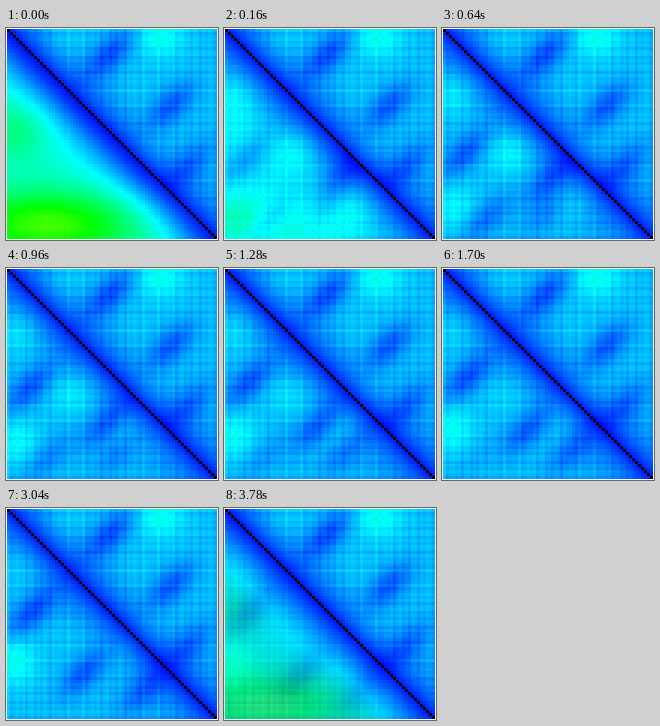
These frames come from a looping animation (212x212 px, 3840 ms). A matplotlib script:

```python
import numpy as np
import matplotlib.pyplot as plt
from matplotlib.animation import FuncAnimation

SIZE, CELLS, CELL = 212, 70, 3
LOOP, TICK = 3840, 20
COLLAPSE, FOLDED, FADE = 320, 2720, 3780

idx = np.arange(CELLS)
pos = 1 + CELL * (idx + 0.5)
X, Y = np.meshgrid(pos, pos)
gap = np.abs(X - Y)

# Side chains alternate along the backbone and weave faint stripes
wave = np.cos(2 * np.pi * idx / 2.5) + 0.6 * np.cos(2 * np.pi * idx / 4.2 + 1)
weave = 0.05 * np.add.outer(wave, wave) * np.minimum(1, gap / 35)

# Contacts travel from a misfolded pose to the native one: (x, y, depth)
FOLDS = [((22, 131, 0.38), (26, 104, 0.42)),
         ((114, 151, 0.34), (78, 165, 0.38)),
         ((100, 182, 0.22), (136, 184, 0.28)),
         ((46, 192, 0.40), (34, 186, 0.00))]
GLOWS = [((70, 124, 0.36), (64, 128, 0.08)),
         ((12, 186, 0.20), (7, 154, 0.34)),
         ((130, 178, 0.24), (112, 146, 0.10)),
         ((12, 68, 0.28), (12, 60, 0.14))]


def spot(x, y, a, b):
    return np.exp(-((X - x) / a) ** 2 / 2 - ((Y - y) / b) ** 2 / 2)


def crease(x, y, length=21, width=10):
    """Soft trough across the diagonal, where the chain turns back."""
    u = (X - x - Y + y) / np.sqrt(2)
    v = (X - x + Y - y) / np.sqrt(2)
    return np.exp(-(u / length) ** 2 / 2 - (v / width) ** 2 / 2)


def rise(reach, top, power=1):
    return 0.06 + top * (1 - np.exp(-(gap / reach) ** power))


def mix(start, end, p):
    return np.add(start, np.subtract(end, start) * p)


def pose(p):
    """Distances below the diagonal; p runs from misfolded (0) to native (1)."""
    field = weave + rise(27, 0.68)
    for start, end in FOLDS:
        x, y, depth = mix(start, end, p)
        field -= depth * crease(x, y)
    for start, end in GLOWS:
        x, y, height = mix(start, end, p)
        field += height * spot(x, y, 16, 16)
    return field


native = pose(1)
extended = (0.25 * weave + rise(45, 1.15, 1.5)
            + 1.05 * spot(42, 197, 62, 23) + 0.35 * spot(8, 102, 24, 20))


def lower_field(t):
    if t < COLLAPSE:
        return mix(extended, pose(0), np.sin(np.pi / 2 * t / COLLAPSE))
    p = min(1, (t - COLLAPSE) / (FOLDED - COLLAPSE))
    return pose(np.sin(np.pi / 2 * p))


def paint(lower):
    """Blue, cyan, green, yellow ramp with a black diagonal."""
    v = np.maximum(np.where(X > Y, native.T, lower), 0.06)
    rgb = np.clip(np.dstack([v - 2, v, 2 - v]), 0, 1)
    rgb[idx, idx] = 0
    return rgb


def picture(t):
    if t >= FADE:
        return (paint(native) + paint(extended)) / 2
    return paint(lower_field(t))


def hold(t):
    """Pictures alternate between 100 ms and 60 ms."""
    beat, rest = divmod(t, 160)
    return beat * 160 + (100 if rest >= 100 else 0)


fig = plt.figure(figsize=(SIZE / 100, SIZE / 100), dpi=100, facecolor="white")
edge, side = 1 / SIZE, CELLS * CELL / SIZE
ax = fig.add_axes([edge, edge, side, side])
ax.axis("off")
image = ax.imshow(picture(0), interpolation="nearest", aspect="auto")


def update(n):
    image.set_data(picture(hold(n * TICK)))
    return [image]


anim = FuncAnimation(fig, update, frames=LOOP // TICK, interval=TICK,
                     repeat=True, repeat_delay=0)
plt.show()
```
